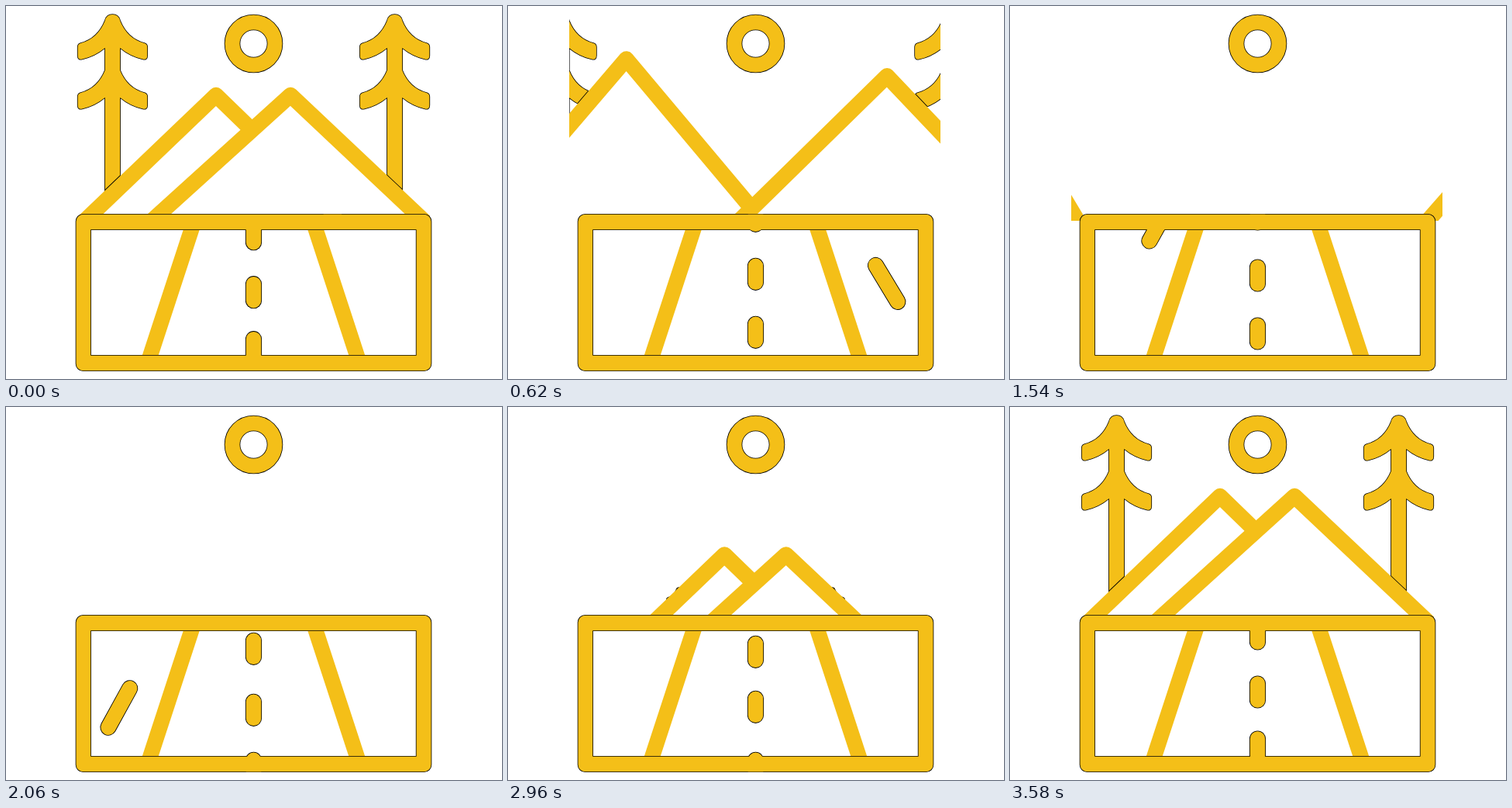
An HTML page with a canvas for the animation above (3.6 s loop, 640x481 px).

```html
<!DOCTYPE html>
<html lang="en">
<head>
<meta charset="utf-8">
<title>Road trip</title>
<style>
html, body { margin: 0; width: 640px; height: 481px; overflow: hidden; background: #fff; }
canvas { display: block; }
</style>
</head>
<body>
<canvas id="stage" width="640" height="481"></canvas>
<script>
const ctx = document.getElementById('stage').getContext('2d');
const LOOP = 3600, GOLD = '#f4bf18', INK = '#000', PAPER = '#fff';
const MID = 319.5, GROUND = 278, PEAK = 115, EDGE = 1.6;
const LEAVE_END = 1650, RISE_START = 2280, RISE_TIME = 1300;

// dir: side it leaves by; inner and outer: where its feet stand
const HILLS = [
  { dir: -1, inner: 439, outer: 100.5, slope: 0.97, steepen: 0.71, lift: 150 },
  { dir: 1, inner: 187, outer: 540, slope: 0.905, steepen: 0.24, lift: 80 }
];

const ease = u => (1 - Math.cos(Math.PI * Math.min(Math.max(u, 0), 1))) / 2;

function hillLeaving(h, e) {
  const y = PEAK - h.lift * e;
  const inner = h.inner + h.dir * 355 * e;
  const x = inner + h.dir * (GROUND - y) / (h.slope + h.steepen * e);
  return { inner, x, y, outer: h.outer + h.dir * 410 * e };
}

function hillRising(h, r) {
  const full = hillLeaving(h, 0);
  const x = full.x - h.dir * 18 * (1 - r);
  return {
    x,
    y: GROUND - (GROUND - PEAK) * r,
    inner: x + (full.inner - full.x) * r,
    outer: x + (full.outer - full.x) * r
  };
}

function makeTree() {
  // Pairs of control point and end point, down the right side
  const bough = y => [
    [19, 31], [41, 37], [44.8, 38], [44.8, 42], [44.8, 48], [44.8, 53],
    [44.8, 59], [39, 57.5], [23, 54], [9.7, 43]
  ].map(p => [p[0], p[1] + y]);
  const half = [
    [0, 0], [8, 0], [9.7, 8], ...bough(0),
    [9.7, 60], [9.7, 72], ...bough(64),
    [9.7, 190], [9.7, 280], [5, 280], [0, 280]
  ];
  const all = half.concat(half.slice(0, -1).reverse().map(p => [-p[0], p[1]]));
  const path = new Path2D();
  path.moveTo(...all[0]);
  for (let i = 1; i < all.length; i += 2) {
    path.quadraticCurveTo(...all[i], ...all[i + 1]);
  }
  path.closePath();
  return path;
}

const tree = makeTree();

const board = new Path2D();
board.roundRect(90.5, 268.8, 458, 201.4, 9);
const frame = new Path2D(board);
frame.rect(109.2, 288.2, 420.4, 162.6);

const sun = new Path2D();
sun.arc(MID, 48.5, 37, 0, 7);
sun.closePath();
sun.moveTo(MID + 18, 48.5);
sun.arc(MID, 48.5, 18, 0, 7);

function stroke(path, color, width) {
  ctx.strokeStyle = color;
  ctx.lineWidth = width;
  ctx.stroke(path);
}

function fill(path, color, rule = 'nonzero') {
  ctx.fillStyle = color;
  ctx.fill(path, rule);
}

function line(...pts) {
  const path = new Path2D();
  for (let i = 0; i < pts.length; i += 2) path.lineTo(pts[i], pts[i + 1]);
  return path;
}

function drawHill(h, trees) {
  const hill = line(h.inner, GROUND, h.x, h.y, h.outer, GROUND);
  ctx.save();
  ctx.clip(trees);
  stroke(hill, INK, 22);
  ctx.restore();
  fill(hill, PAPER);
  stroke(hill, GOLD, 20.3);
}

function drawScenery(hills, reach, top, size) {
  const trees = new Path2D();
  for (const x of [MID - reach, MID + reach]) {
    trees.addPath(tree, new DOMMatrix([size, 0, 0, size, x, top]));
  }
  ctx.save();
  ctx.beginPath();
  ctx.rect(79, 0, 479, 277);
  ctx.clip();
  stroke(trees, INK, EDGE);
  fill(trees, GOLD);
  hills.forEach(h => drawHill(h, trees));
  ctx.restore();
}

function drawLeaving(t) {
  const e = ease(t / LEAVE_END);
  const reach = 182 + 104 * (t / 900) ** 1.13;
  drawScenery(HILLS.map(h => hillLeaving(h, e)), reach, 11, 1);
}

function drawRising(t) {
  const r = ease((t - RISE_START) / RISE_TIME), rest = 1 - r;
  const size = Math.max(0.2, 1 - 1.4 * rest);
  drawScenery(HILLS.map(h => hillRising(h, r)), 182 - 180 * rest, 11 + 480 * rest, size);
}

function roadMarks(t) {
  const marks = [];
  for (let i = 0; i < 4; i++) {
    const y = 208.6 + (75 * i + t / 12) % 300 - (i === 3 ? 4 : 0);
    marks.push(line(MID, y, MID, y + 21));
  }
  if (t < 1400) {
    marks.push(line(417 + 0.0926 * t, 262 + 0.1167 * t, 427 + 0.122 * t, 277 + 0.168 * t));
  }
  const u = t - 1400;
  if (u > 0 && u < 1300) {
    marks.push(line(202 - 0.064 * u, 257 + 0.16 * u, 193 - 0.0923 * u, 273 + 0.212 * u));
  }
  return marks;
}

function drawRoad(t) {
  const marks = roadMarks(t);
  fill(board, PAPER);

  ctx.lineCap = 'butt';
  for (const side of [-1, 1]) {
    stroke(line(MID + side * 76.8, 278, MID + side * 136.4, 460), GOLD, 20);
  }

  // Ink first, then gold, so touching shapes share one outline
  ctx.lineCap = 'round';
  stroke(frame, INK, EDGE);
  ctx.save();
  ctx.clip(board);
  marks.forEach(m => stroke(m, INK, 21.2));
  marks.forEach(m => stroke(m, GOLD, 19.5));
  ctx.restore();
  fill(frame, GOLD, 'evenodd');
}

function draw(t) {
  ctx.fillStyle = PAPER;
  ctx.fillRect(0, 0, 640, 481);
  ctx.lineJoin = 'round';
  ctx.lineCap = 'butt';
  stroke(sun, INK, EDGE);
  fill(sun, GOLD, 'evenodd');
  if (t < LEAVE_END) drawLeaving(t);
  else if (t > RISE_START) drawRising(t);
  drawRoad(t);
}

const start = performance.now();
function tick() {
  draw((performance.now() - start) % LOOP);
  requestAnimationFrame(tick);
}
tick();
</script>
</body>
</html>
```
